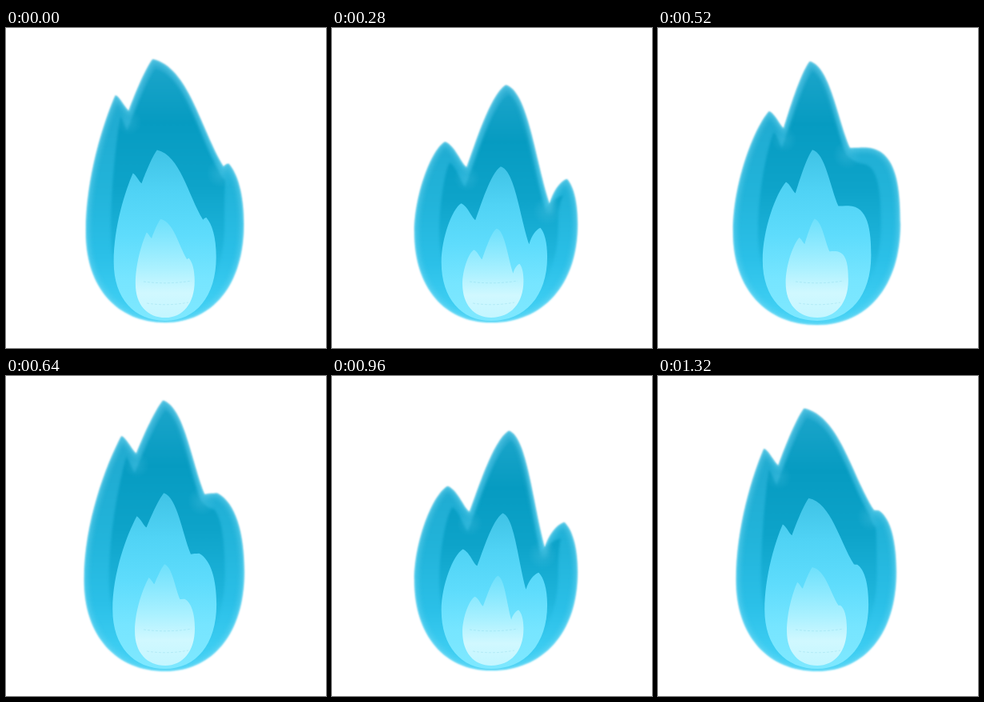
Write an HTML page with a canvas that moves like this. It is 400 px wide and 400 px high and loops after 1360 ms.

```html
<!DOCTYPE html>
<html lang="en">
<head>
<meta charset="utf-8">
<title>Blue flame</title>
<style>
html, body { margin: 0; width: 100%; height: 100%; overflow: hidden; background: #fff; }
canvas { display: block; width: 400px; height: 400px; }
</style>
</head>
<body>
<canvas id="stage" width="400" height="400"></canvas>
<script>
const ctx = document.getElementById('stage').getContext('2d');
const LOOP = 1360, STEP = 40, AXIS = 199;

// The flame flickers twice per loop; each point passes these places in a flicker.
const phases = [0.235, 0.41, 0.59, 0.72, 0.97];
const tracks = {
  left: [[184, 38], [143, 140], [151, 113], [135, 114], [140, 80]],
  main: [[196, 33], [219, 70], [206, 63], [185, 48], [190, 35]],
  notch: [[267, 224], [269, 218], [263, 217], [247, 161], [260, 160]],
  right: [[288, 171], [292, 186], [285, 198], [264, 160], [271, 158]]
};
// Slow drift over the whole loop, so that the two flickers differ
const drift = { left: [-6, 8], main: [-7, 5], notch: [11, 10], right: [6, 11] };

const mix = (a, b, u) => a + (b - a) * u;
const wave = (p, peak) => Math.cos(2 * Math.PI * (p - peak));

// Periodic cubic through the points of a track
function follow(track, p) {
  const n = phases.length;
  if (p < phases[0]) p += 1;
  const i = phases.findLastIndex(v => v <= p);
  const time = k => phases[(k + n) % n] + Math.floor(k / n);
  const point = k => track[(k + n) % n];
  const h = time(i + 1) - time(i), u = (p - time(i)) / h;
  const slope = (k, c) => 0.6 * h * (point(k + 1)[c] - point(k - 1)[c]) / (time(k + 1) - time(k - 1));
  return [0, 1].map(c => {
    const a = point(i)[c], b = point(i + 1)[c], ease = u * u * (3 - 2 * u);
    return mix(a, b, ease) + u * (1 - u) * ((1 - u) * slope(i, c) - u * slope(i + 1, c));
  });
}

function pose(t) {
  const p = t / LOOP * 2 % 1, slow = wave(t / LOOP, 0);
  const at = name => follow(tracks[name], p).map((v, c) => v + slow * drift[name][c]);
  const left = at('left'), main = at('main'), gap = main[0] - left[0];
  return {
    points: [
      [100 + 6 * wave(p, 0.25), 255],
      left,
      [left[0] + 0.36 * gap, left[1] + 0.42 * gap],
      main,
      at('notch'),
      at('right'),
      [302.5 + 5.5 * wave(p, 0.52), 245],
      [AXIS, 368.7 - 2.5 * wave(p, 0.2)]
    ],
    round: [0.3 + 0.3 * wave(p, 0.5), 0.35 + 0.25 * wave(p, 0.45), 0.5 + 0.5 * wave(p, 0.7)]
  };
}

function outline([side, left, dip, main, notch, right, edge, base], [rl, rm, rr]) {
  const path = new Path2D();
  // Control points are given as fractions of the span
  const span = (a, b, u1, v1, u2, v2) => path.bezierCurveTo(
    mix(a[0], b[0], u1), mix(a[1], b[1], v1), mix(a[0], b[0], u2), mix(a[1], b[1], v2), ...b);
  path.moveTo(...side);
  span(side, left, 0, 0.4, 0.6 - 0.1 * rl, 0.8 + 0.2 * rl);
  span(left, dip, 0.35 + 0.2 * rl, 0.15, 0.75, 0.9);
  span(dip, main, 0.2, 0.25, 0.66 - 0.1 * rm, 0.76 + 0.2 * rm);
  span(main, notch, 0.5, 0.08 - 0.06 * rm, 0.67, 0.64);
  span(notch, right, 0.2, 0.5, 0.6, 0.9);
  span(right, edge, 0.4 + 0.5 * rr, 0.25 * (1 - rr), 1, 0.5);
  span(edge, base, 0, 0.62, 0.4, 1);
  span(base, side, 0.6, 0, 1, 0.38);
  path.closePath();
  return path;
}

// The inner flames are smaller copies standing on their own base line
function shrink(points, scale, floor) {
  const bottom = points[7][1];
  return points.map(([x, y]) => [AXIS + (x - AXIS) * scale, floor + (y - bottom) * scale]);
}

const inset = [[31, 0], [6, 26], [-2, 24], [3, 12], [-5, 6], [-4, 20], [-24, 0], [0, -11]];

function ramp(y0, y1, ...colors) {
  const g = ctx.createLinearGradient(0, y0, 0, y1);
  colors.forEach((c, i) => g.addColorStop(i / (colors.length - 1), c));
  return g;
}

function glow([x, y], radius, alpha) {
  const g = ctx.createRadialGradient(x, y, 0, x, y, radius);
  g.addColorStop(0, `rgba(92,201,231,${alpha})`);
  g.addColorStop(1, 'rgba(92,201,231,0)');
  ctx.fillStyle = g;
  ctx.fillRect(x - radius, y - radius, 2 * radius, 2 * radius);
}

function crease(y, half) {
  ctx.beginPath();
  ctx.moveTo(AXIS + 3 - half, y);
  ctx.quadraticCurveTo(AXIS + 3, y + 4, AXIS + 3 + half, y - 1);
  ctx.stroke();
}

function draw(t) {
  const { points, round } = pose(t);
  const body = outline(points, round), top = points[3][1], bottom = points[7][1];

  ctx.clearRect(0, 0, 400, 400);
  ctx.filter = 'blur(0.8px)';
  ctx.fillStyle = ramp(top, bottom, '#29abd0', '#20acd2', '#22b4da', '#2bc0e8', '#46d4f7');
  ctx.fill(body);

  ctx.save();
  ctx.clip(body);
  ctx.filter = 'blur(1.6px)';
  ctx.fillStyle = ramp(top, bottom - 14, '#1da5ca', '#069bc1', '#0da3c9', '#1fb5dc', 'rgba(60,208,246,0)');
  ctx.fill(outline(points.map((p, i) => p.map((v, c) => v + inset[i][c])), round));
  ctx.filter = 'none';
  glow([points[2][0], points[2][1] + 14], 16, 0.25);
  glow([points[4][0] - 3, points[4][1] + 8], 18, 0.3);
  ctx.filter = 'blur(3px)';
  ctx.lineWidth = 7;
  ctx.strokeStyle = 'rgba(120,218,243,.5)';
  ctx.stroke(body);
  ctx.restore();

  const middle = shrink(points, 0.65, 366), core = shrink(points, 0.375, 362);
  ctx.filter = 'blur(0.6px)';
  ctx.fillStyle = ramp(middle[3][1], 366, '#3fc3e6', '#50d3f5', '#5edcfc', '#76e5ff', '#7ee8ff');
  ctx.fill(outline(middle, round));
  ctx.fillStyle = ramp(core[3][1], 362, '#6ee0fb', '#8ce9fe', '#abf1ff', '#d0f8ff', '#c4f6ff');
  ctx.fill(outline(core, round));

  ctx.filter = 'none';
  ctx.lineWidth = 0.7;
  ctx.strokeStyle = 'rgba(90,185,210,.3)';
  ctx.setLineDash([3, 2]);
  crease(317, 30);
  crease(344, 26);
  ctx.setLineDash([]);
}

function tick() {
  draw(Math.floor(performance.now() % LOOP / STEP) * STEP);
  requestAnimationFrame(tick);
}
tick();
</script>
</body>
</html>
```
